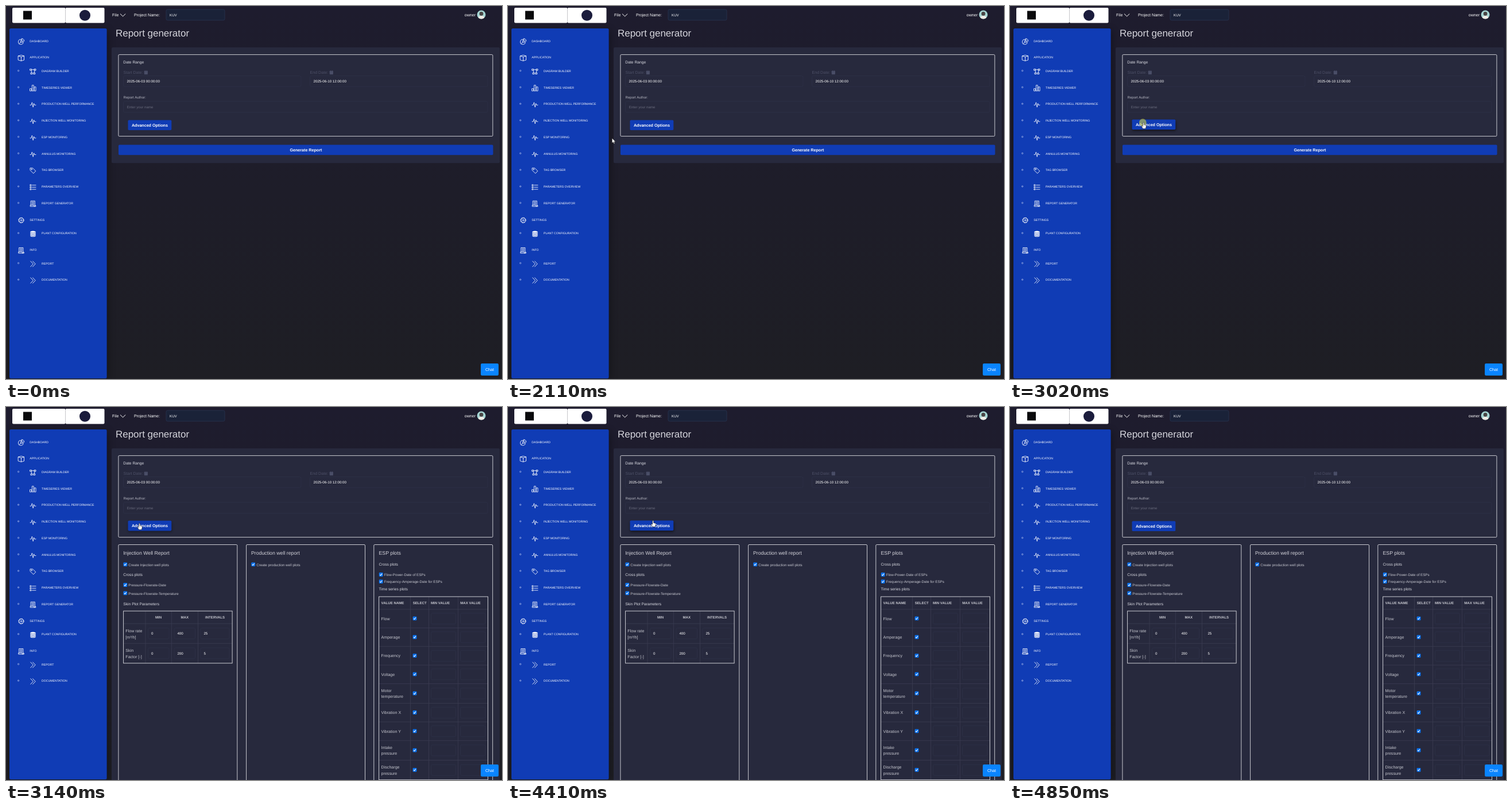
Animation, 864 px wide and 649 px high, one loop 5.37 s. Source, as an HTML page:

```html
<!DOCTYPE html>
<html lang="en">
<head>
<meta charset="utf-8">
<title>Report generator</title>
<style>
  html, body { margin: 0; width: 100%; height: 100%; overflow: hidden; background: #1e1e26; }
  svg { display: block; width: 864px; height: 649px; }
  text { font-family: "Liberation Sans", Arial, sans-serif; text-rendering: geometricPrecision; white-space: pre; }
  .icon { fill: none; stroke: #fff; stroke-width: .85; stroke-linejoin: round; stroke-linecap: round; }
</style>
</head>
<body>
<svg id="stage" viewBox="0 0 864 649" xmlns="http://www.w3.org/2000/svg"></svg>
<script>
const LOOP = 5370;
const BLUE = '#103cb5', CARD = '#27293d', LINE = '#dcdce2', FAINT = '#2e3148', GRID = '#3b3d52', SOFT = '#c6c7cf';

const rect = (x, y, w, h, fill, r = 0, stroke = 'none', extra = '') =>
  `<rect x="${x}" y="${y}" width="${w}" height="${h}" rx="${r}" fill="${fill}" stroke="${stroke}" ${extra}/>`;
const text = (s, x, y, size, fill = '#fff', extra = '') =>
  `<text x="${x}" y="${y}" font-size="${size}" fill="${fill}" ${extra}>${s}</text>`;
const path = (d, stroke, width = 1, fill = 'none') =>
  `<path d="${d}" fill="${fill}" stroke="${stroke}" stroke-width="${width}"/>`;
const frame = (x, y, w, h) => rect(x, y, w, h, 'none', 1.5, LINE, 'stroke-width=".9"');
const field = (x, y, w, h) => rect(x, y, w, h, 'none', 2.5, FAINT, 'stroke-width=".8"');
const bold = 'font-weight="700"';
const middle = 'text-anchor="middle"';

// Icons are centred on 0,0
const icons = {
  pie: '<path d="M-.7-3.8A4.4 4.4 0 1 0 3.7 1.2H-.7ZM1-5V-.7H5.2A4.4 4.4 0 0 0 1-5M-.7 1.2L-4 4"/>',
  box: '<path d="M-5-3.6L0-5 5-3.6V3.5L0 5-5 3.5ZM-5-3.6L0-2 5-3.6M0-2V5"/>',
  flow: '<path d="M-2.3-3.2H2.3M-3.2-2L-2 2.2M3.2-2L2 2.2M-5-4.3h2.6v2.3H-5ZM2.4-4.3H5v2.3H2.4ZM-3.7 2.2h2.6v2.3h-2.6ZM1.1 2.2h2.6v2.3H1.1Z"/>',
  bars: '<path d="M-5 1h2.4v4H-5ZM-1.2-5h2.4V5h-2.4ZM2.6-2H5v7H2.6Z"/>',
  pulse: '<path d="M-5 .8h2l1.4-4.6L.2 4.6 1.6-2 2.7 .8H5"/>',
  tag: '<path d="M-4.6-4.6H-.5L4.8 .7 .7 4.8-4.6-.5Z"/><circle cx="-2.4" cy="-2.4" r=".8"/>',
  list: '<path d="M-1.4-3.6H5M-1.4 0H5M-1.4 3.6H5M-4.8-4.5h1.8v1.8h-1.8ZM-4.8-.9h1.8V.9h-1.8ZM-4.8 2.7h1.8v1.8h-1.8Z"/>',
  script: '<path d="M-3.8 2.6V-4.8H3.3V4.8H-4.8V2.6H1.5V4.2L3.3 4.8H4.8V3H3.3M-2-2.9H1.6M-2-1H1.6M-2 .9H1.6"/>',
  gear: '<circle r="4" /><circle r="4.6" stroke-dasharray="1.8 1.81"/><circle r="1.4"/>',
  data: '<path fill="#fff" stroke="none" d="M-4.7-3.6C-4.7-5.6 4.7-5.6 4.7-3.6V3.6C4.7 5.6-4.7 5.6-4.7 3.6Z"/><path stroke="' + BLUE +
    '" stroke-width=".7" d="M-4.7-2.3Q0-.4 4.7-2.3M-4.7 .2Q0 2.1 4.7 .2M-4.7 2.7Q0 4.6 4.7 2.7"/>',
  arrows: '<path d="M-4.2-4.8L.4 0-4.2 4.8M-.4-4.8L4.2 0-.4 4.8"/>'
};

const menu = [
  ['DASHBOARD', 61, 'pie', 0], ['APPLICATION', 89.7, 'box', 0],
  ['DIAGRAM BUILDER', 113.2, 'flow', 1], ['TIMESERIES VIEWER', 142, 'bars', 1],
  ['PRODUCTION WELL PERFORMANCE', 170.7, 'pulse', 1], ['INJECTION WELL MONITORING', 199.5, 'pulse', 1],
  ['ESP MONITORING', 228.2, 'pulse', 1], ['ANNULUS MONITORING', 257, 'pulse', 1],
  ['TAG BROWSER', 285.7, 'tag', 1], ['PARAMETERS OVERVIEW', 314.5, 'list', 1],
  ['REPORT GENERATOR', 343.2, 'script', 1], ['SETTINGS', 372, 'gear', 0],
  ['PLANT CONFIGURATION', 395.7, 'data', 1], ['INFO', 424.5, 'script', 0],
  ['REPORT', 448, 'arrows', 1], ['DOCUMENTATION', 476.7, 'arrows', 1]
];

const menuItem = ([label, y, icon, nested]) =>
  (nested ? `<circle cx="21.6" cy="${y - .6}" r="1.15" fill="none" stroke="#dfe5fb" stroke-width=".6"/>` : '') +
  `<g class="icon" transform="translate(${nested ? 47 : 26.5} ${y + .8})">${icons[icon]}</g>` +
  text(label, nested ? 62 : 41.3, y + 1.7, 5.16);

const calendar = (x, y) => rect(x, y, 6.4, 6.4, '#42465f', .8) +
  path(`M${x} ${y + 2}h6.4M${x + .8} ${y + 3.6}h4.8M${x + .8} ${y + 5}h4.8M${x + 1.7} ${y - .8}v1.6M${x + 4.7} ${y - .8}v1.6`, '#5c6079', .5);

const check = (x, y) => rect(x - 3.4, y - 3.4, 6.8, 6.8, '#0b72ee', 1.2) +
  path(`M${x - 1.9} ${y + .1}l1.3 1.5 2.5-3.2`, '#fff', 1.05);
const option = (label, x, y) => check(x, y - .2) + text(label, x + 5.5, y + 2.5, 6.2, SOFT);

function header() {
  return rect(11, 3, 92.5, 26.5, '#fff', 2) + rect(103.5, 3, 68, 26.5, '#fff', 2) +
    rect(30, 8.5, 15, 15, '#0a0a0c') + '<circle cx="137.5" cy="16.2" r="9.5" fill="#1b1c3c"/>' +
    text('File', 185, 18, 7.1) + path('M199 13.6l4.6 4.4 4.6-4.4', '#fff', 1) +
    text('Project Name:', 223, 18, 7.1) +
    rect(279, 6, 102, 18.8, '#1a2238', 2.5, '#293552', 'stroke-width=".8"') + text('KUV', 285, 17.6, 6.2) +
    text('owner', 798.8, 17.7, 7.1) +
    '<circle cx="828" cy="15" r="7.5" fill="#a5d5d3"/><circle cx="828" cy="13.4" r="3.4" fill="#4a4544"/>' +
    '<path d="M822.8 20.4Q823 17 828 17t5.2 3.4A7.5 7.5 0 0 1 822.8 20.4" fill="#f0ece6"/>' +
    text('Report generator', 191, 53.3, 16.95, '#d5d5dc');
}

function form() {
  return frame(195.9, 84.6, 652, 142) + text('Date Range', 204.3, 99.6, 6.75, '#dcdde4') +
    [['Start Date:', 204.5, '2025-06-03 00:00:00', 240.6], ['End Date:', 529.5, '2025-06-10 12:00:00', 563.6]]
      .map(([label, x, value, cx]) => text(label, x, 118.3, 7.1, '#4d5067') + calendar(cx, 112.8) +
        field(x, 121.6, 309.5, 18.6) + text(value, x + 6, 133, 6.2)).join('') +
    text('Report Author:', 204.5, 160.5, 6.1, '#b4b5c0') + field(204.5, 166, 634.5, 19) +
    text('Enter your name', 210.7, 177.7, 6.2, '#686a7c');
}

function skinTable() {
  const row = (y, labels, values) => text(labels[0], 208.3, y - 2.3, 7.1, SOFT) + text(labels[1], 208.3, y + 8.7, 7.1, SOFT) +
    [[247.5, 36.5], [293, 36.5], [339, 50]].map(([x, w], i) =>
      field(x, y - 9.5, w, 19) + text(values[i], x + 5.4, y + 2.2, 6.2)).join('');
  return path('M204.5 377H394M204.5 411.3H394M243 355V446M288.3 355V446M334.5 355V446', GRID, .8) +
    rect(204.6, 355, 189.5, 90.8, 'none', 0, LINE, 'stroke-width=".9"') +
    [['MIN', 265.5], ['MAX', 311.2], ['INTERVALS', 364]].map(([s, x]) => text(s, x, 368.2, 6.1, SOFT, `${bold} ${middle}`)).join('') +
    row(394, ['Flow rate', '[m³/h]'], [0, 400, 25]) + row(428.5, ['Skin', 'Factor [-]'], [0, 200, 5]);
}

function espTable() {
  const names = ['Flow', 'Amperage', 'Frequency', 'Voltage', 'Motor temperature', 'Vibration X', 'Vibration Y', 'Intake pressure', 'Discharge pressure'];
  let y = 352, out = '';
  for (const name of names) {
    const words = name.includes('Vibration') ? [name] : name.split(' ');
    const height = words.length > 1 ? 34.2 : 32.35, mid = y + height / 2;
    words.forEach((word, i) => out += text(word, 653.6, mid + 2.5 + (i - (words.length - 1) / 2) * 10.8, 7.1, SOFT));
    out += check(712, mid - .3) + field(740.5, mid - 9.5, 43, 19) + field(791.5, mid - 9.5, 43.5, 19);
    out += path(`M649.5 ${y}H839.4`, GRID, .8);
    y += height;
  }
  return out + path(`M704.5 330V${y}M736.5 330V${y}M787.6 330V${y}`, GRID, .8) +
    rect(649.6, 330, 189.8, y - 330, 'none', 0, LINE, 'stroke-width=".9"') +
    [['VALUE NAME', 653.6], ['SELECT', 708.7], ['MIN VALUE', 740], ['MAX VALUE', 791.3]]
      .map(([s, x]) => text(s, x, 343, 6.1, SOFT, bold)).join('');
}

function advanced() {
  return rect(184, 72, 676, 590, CARD, 2) +
    [195.9, 418.6, 640.8].map(x => frame(x, 239.5, 206.9, 430)).join('') +
    [['Injection Well Report', 204.2], ['Production well report', 427], ['ESP plots', 649.5]]
      .map(([s, x]) => text(s, x, 257.3, 8.75, '#d5d5dc')).join('') +
    option('Create Injection well plots', 207.8, 274) + option('Create production well plots', 430.7, 274) +
    text('Cross plots', 204.3, 294.3, 6.7, '#dcdde4') +
    option('Pressure-Flowrate-Date', 207.8, 309.7) + option('Pressure-Flowrate-Temperature', 207.8, 324) +
    text('Skin Plot Parameters', 204.3, 344.5, 6.7, '#dcdde4') + skinTable() +
    text('Cross plots', 649.5, 276, 6.7, '#dcdde4') +
    option('Flow-Power-Date of ESPs', 653.2, 291.7) + option('Frequency-Amperage-Date for ESPs', 653.2, 303.8) +
    text('Time series plots', 649.5, 319, 6.7, '#dcdde4') + espTable();
}

const stage = document.getElementById('stage');
stage.innerHTML = `
  <defs>
    <linearGradient id="page" x2="0" y2="1"><stop stop-color="#1e1c2e"/><stop offset="1" stop-color="#1e1e24"/></linearGradient>
    <filter id="blur" x="-20%" y="-20%" width="140%" height="140%"><feGaussianBlur stdDeviation="7"/></filter>
    <filter id="soft" x="-20%" y="-60%" width="140%" height="220%"><feGaussianBlur stdDeviation="2"/></filter>
  </defs>
  ${rect(0, 0, 864, 649, 'url(#page)')}
  ${rect(6, 42, 172, 608, '#000', 3, 'none', 'opacity=".32" filter="url(#blur)"')}
  <g id="basic">${rect(184, 72, 676, 201.3, CARD, 2)}${rect(196, 241.5, 652.5, 17.7, BLUE, 1.8)}
    ${text('Generate Report', 522.4, 253.2, 7.15, '#fff', `${bold} ${middle}`)}</g>
  <g id="advanced">${advanced()}</g>
  ${rect(6, 39, 169.6, 609, BLUE, 2.5)}
  ${menu.map(menuItem).join('')}
  ${header()}${form()}
  <g id="button">${rect(213, 201, 76, 17, '#000', 2, 'none', 'id="glow" filter="url(#soft)"')}
    ${rect(212.5, 198.4, 75.8, 17.7, BLUE, 1.8)}
    ${text('Advanced Options', 250.4, 210, 7.13, '#fff', `${bold} ${middle}`)}</g>
  ${rect(827, 622, 31, 21, '#0a84ff', 2.2)}${text('Chat', 842.5, 635, 7.1, '#fff', middle)}
  <circle id="press" cx="231.3" cy="202.7" r="6.4" fill="#d6d640" opacity=".58"/>
  <g id="cursor">
    <path id="arrow" d="M0 0V8.6L2 6.8 3.4 9.8 4.8 9.1 3.5 6.2H6.1Z" fill="#fff" stroke="#111" stroke-width=".5"/>
    <path id="hand" d="M-1 .9Q-1 0 0 0T1 .9V4l2.9.7q1.1.3 1 1.5L4.4 8.8 3.7 10.8H-.9L-3.2 7.1q-.5-1.3.7-1.3L-1 6.8Z" fill="#fff" stroke="#111" stroke-width=".6"/>
  </g>`;

const el = id => document.getElementById(id);
const parts = Object.fromEntries(['basic', 'advanced', 'button', 'glow', 'press', 'cursor', 'arrow', 'hand'].map(id => [id, el(id)]));
const show = (part, on) => part.setAttribute('visibility', on ? 'visible' : 'hidden');
const mix = (a, b, p) => a + (b - a) * p;

const ticks = [0, 1700, 1800, 1900, 2010, 2110, 2210, 2310, 2410, 3020, 3140, 3240, 4410, 4530, 4630, 4740, 4850];

function pointer(t) {
  if (t < 2310) {
    const p = (t - 1700) / 610, e = p * p * (3 - 2 * p);
    return [mix(30.6, 232, e), mix(311.2, 202.6, e)];
  }
  if (t < 4410) return [232.4, 202.6];
  const p = (t - 4410) / 330;
  return [mix(252.7, 496, p), mix(197.6, 1, p)];
}

function hoverAt(t) {
  if (t < 2310 || t >= 4530) return 0;
  if (t < 2410) return .5;
  return t === 3140 ? .7 : 1;
}

function render(ms) {
  const now = ms % LOOP;
  const t = ticks.filter(tick => tick <= now).pop();
  const open = t >= 3140, hover = hoverAt(t), visible = t >= 1700 && t < 4850;
  const [x, y] = pointer(t);
  show(parts.basic, !open);
  show(parts.advanced, open);
  parts.button.setAttribute('transform', `translate(0 ${-hover})`);
  parts.glow.setAttribute('opacity', hover * .5);
  show(parts.press, t === 3020);
  parts.cursor.setAttribute('transform', `translate(${x} ${y})`);
  show(parts.arrow, visible && !hover);
  show(parts.hand, visible && hover > 0);
}

const start = performance.now();
function loop() {
  render(performance.now() - start);
  requestAnimationFrame(loop);
}
loop();
</script>
</body>
</html>
```
